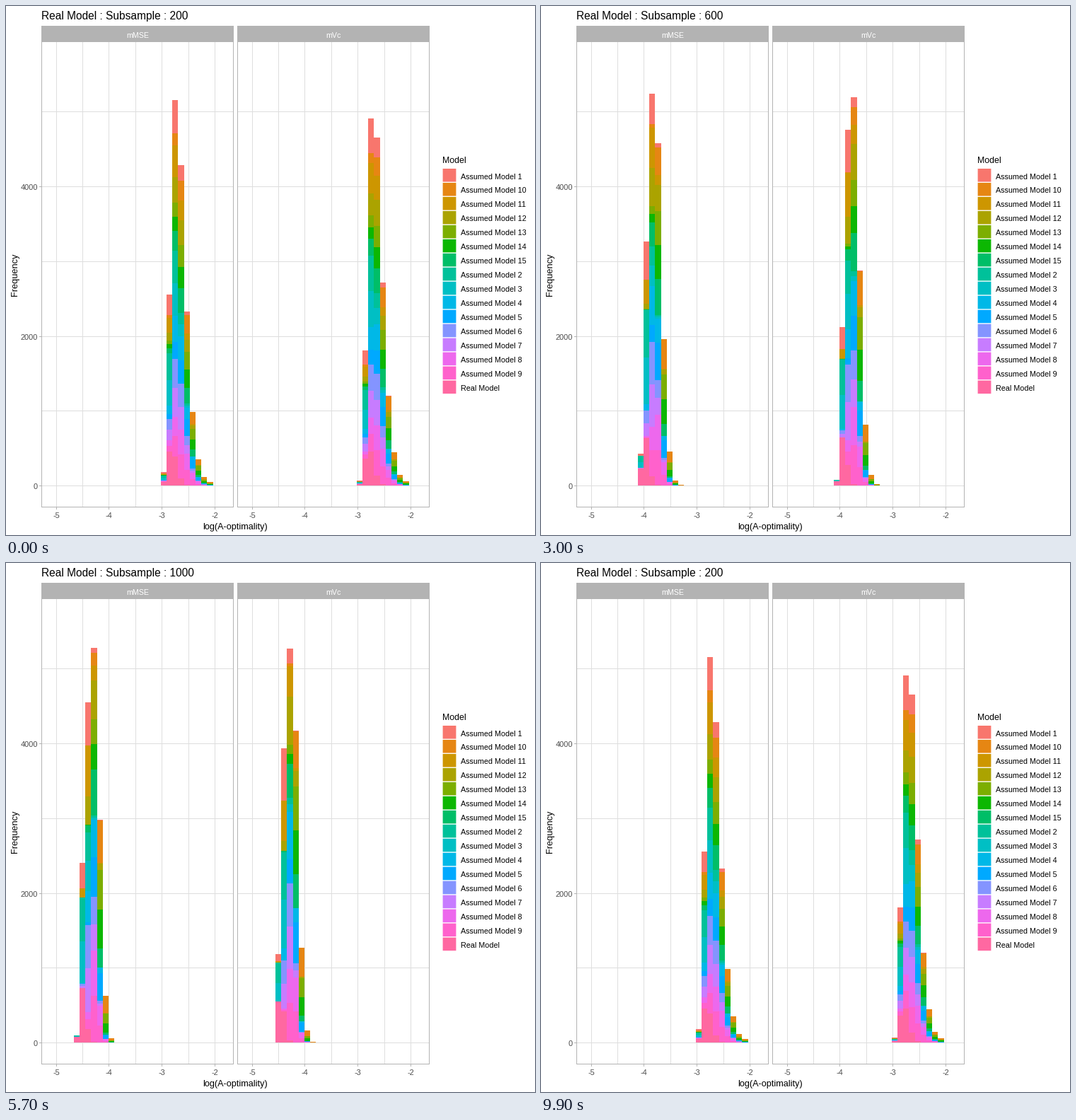
A matplotlib script for the animation above (10 s loop, 748x748 px).

```python
import math

import matplotlib.pyplot as plt
import numpy as np
from matplotlib.animation import FuncAnimation
from matplotlib.collections import PolyCollection
from matplotlib.patches import Rectangle

SIZE, DPI = 748, 100
plt.rcParams["font.family"] = "Liberation Sans"

LEVELS = [f"Assumed Model {i}" for i in (1, *range(10, 16), *range(2, 10))]
LEVELS.append("Real Model")
COLORS = ["#F8766D", "#E68613", "#CD9600", "#ABA300", "#7CAE00", "#0CB702",
          "#00BE67", "#00C19A", "#00BFC4", "#00B8E7", "#00A9FF", "#8494FF",
          "#C77CFF", "#ED68ED", "#FF61CC", "#FF68A1"]
GREY, GRID, TICK_TEXT = "#B3B3B3", "#DEDEDE", "#4D4D4D"

# Offset of each model from the panel mean, in bins, at large subsamples
OFFSET = np.array([-.98, 1.5, -.61, .04, 1.18, 1.15, .55, -1.3,
                   -1.26, -.02, .79, -.28, -.3, .56, .47, -1.64])
DRAWS, BINS, BIN_WIDTH, SKEW = 1000, 27, .1102, .2
STATES = range(200, 1501, 100)
FRAMES = 100

erf = np.vectorize(math.erf)


def counts(n, base, drift):
    """Expected histogram at subsample n: one row per model, one column per bin."""
    t = math.sqrt(200 / n)
    centre = base + drift * t * t - math.log(n) / BIN_WIDTH
    mean = centre + OFFSET * (1.18 - .48 * t)
    sd = (.48 + .04 * OFFSET) * (2.65 * t) ** (.8 + .15 * OFFSET)
    z = (np.arange(BINS + 1) - mean[:, None]) / sd[:, None]
    y = np.log(np.maximum(1 + SKEW * (z + SKEW / 2), 1e-9)) / SKEW
    cdf = (1 + erf(y / math.sqrt(2))) / 2
    cdf[:, 0], cdf[:, -1] = 0, 1
    return DRAWS * np.diff(cdf)


DATA = np.array([[counts(n, 68.76, .53), counts(n, 69.19, .31)] for n in STATES])

fig = plt.figure(figsize=(SIZE / DPI, SIZE / DPI), dpi=DPI, facecolor="white")
ax = fig.add_axes([0, 0, 1, 1])
ax.set(xlim=(0, SIZE), ylim=(SIZE, 0))
ax.axis("off")


def box(x, y, w, h, color, **kw):
    style = dict(fc=color, ec="none", lw=0, aa=False) | kw
    ax.add_patch(Rectangle((x, y), w, h, **style))


def label(x, y, s, px, color="black", **kw):
    return ax.text(x, y, s, fontsize=px * .72, color=color, **kw)


def x_pos(v):
    return np.round(70.75 + 74.71 * (v + 5))


def y_pos(v):
    return np.round(678.2 - .1058 * v)


def draw_panel(left, name):
    shift = left - 50
    box(left, 28, 272, 22, GREY)
    label(left + 136, 44.5, name, 10.6, "white", ha="center")
    for v in range(0, 6000, 1000):
        box(left, y_pos(v), 272, 1, GRID)
    for v in np.arange(-5, -1.9, .5):
        box(x_pos(v) + shift, 51, 1, 658, GRID)
    for x in (left, left + 271):
        box(x, 50, 1, 659, GREY)
    for y in (50, 708):
        box(left, y, 272, 1, GREY)
    for v in range(-5, -1):
        x = x_pos(v) + shift
        box(x, 709, 1, 3, GREY)
        label(x, 724, str(v), 11, TICK_TEXT, ha="center")


draw_panel(50, "mMSE")
draw_panel(327, "mVc")
for v in (0, 2000, 4000):
    box(47, y_pos(v), 3, 1, GREY)
    label(45, y_pos(v) + 5, str(v), 11, TICK_TEXT, ha="right")

label(324.5, 740, "log(A-optimality)", 12.6, ha="center")
label(13.5, 379.5, "Frequency", 12.8, rotation=90, ha="center", va="center")
label(617, 222, "Model", 12.4)
for i, (name, color) in enumerate(zip(LEVELS, COLORS)):
    y = 230 + 19.97 * i
    box(617.6, y, 18.8, 18.6, color, aa=True, snap=False)
    label(643, y + 14.5, name, 10.75)
title = label(50, 19, "", 15.5)

bars = PolyCollection([], linewidths=0, edgecolors="none", antialiaseds=False, zorder=2)
ax.add_collection(bars, autolim=False)
EDGES = np.round(71.33 + 8.1945 * np.arange(BINS + 1))


# The spare frames of the loop lengthen the first pauses and transitions.
def first_step(k):
    return 4 + 7 * k + min(k, 3) - (k >= 7)


def last_step(k):
    return 7 + 7 * k + min(k, 2) - (k >= 6)


def pose(frame):
    """Current state, next state and progress between them."""
    k = sum(frame >= first_step(j) for j in range(len(STATES))) - 1
    if k < 0:
        return 0, 0, 0.0
    start = first_step(k) - 1
    progress = min(1.0, (frame - start) / (last_step(k) - start))
    return k, (k + 1) % len(STATES), progress


def draw(frame):
    a, b, p = pose(frame)
    now = DATA[a] * (1 - p) + DATA[b] * p
    title.set_text(f"Real Model : Subsample : {STATES[b if p > .5 else a]}")
    verts, fills = [], []
    for panel, shift in enumerate((0, 277)):
        tops = y_pos(np.cumsum(now[panel][::-1], axis=0))
        lows = np.vstack([np.full(BINS, 678.0), tops[:-1]])
        for g, k in np.argwhere(lows > tops):
            x0, x1 = EDGES[k] + shift, EDGES[k + 1] + shift
            y0, y1 = lows[g, k], tops[g, k]
            verts.append([(x0, y0), (x1, y0), (x1, y1), (x0, y1)])
            fills.append(COLORS[-1 - g])
    bars.set_verts(verts)
    bars.set_facecolor(fills)
    return bars, title


anim = FuncAnimation(fig, draw, frames=FRAMES, init_func=lambda: draw(0),
                     interval=100, repeat=True, repeat_delay=0, blit=False)
plt.show()
```
